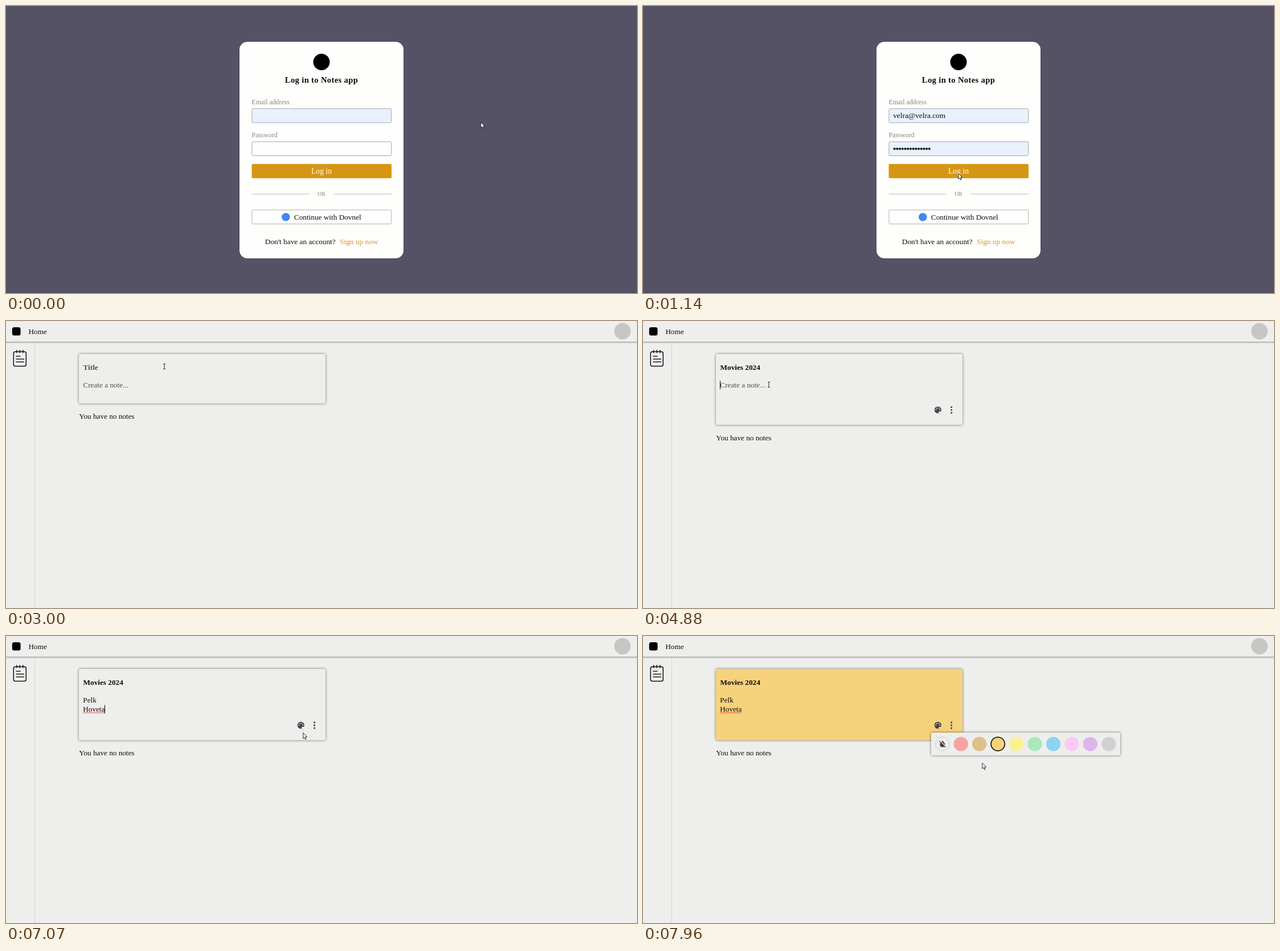
An HTML page with a canvas that plays this animation: 1108 by 505 pixels, repeating every 8 s.

```html
<!DOCTYPE html>
<html lang="en">
<head>
<meta charset="utf-8">
<title>Notes app</title>
<style>
  html, body { margin: 0; width: 100%; height: 100%; overflow: hidden; }
  canvas { display: block; }
</style>
</head>
<body>
<canvas id="stage" width="1108" height="505"></canvas>
<script>
const ctx = document.getElementById('stage').getContext('2d');
const LOOP = 8000;
const SERIF = '"Liberation Serif", "Times New Roman", serif';
const PAPER = '#eeeeec', INK = '#0c0c0c', GREY = '#505050';
const EMAIL = 'velra@velra.com';
const TITLE = 'Movies 2024', LINE1 = 'Pelk', LINE2 = 'Hoveta';

// Times of the key presses
const TITLE_KEYS = [3070, 3070, 3180, 3620, 3700, 3770, 4000, 4060, 4120, 4180, 4330];
const LINE1_KEYS = [5400, 5550, 5600, 5660];
const LINE2_KEYS = [6110, 6190, 6270, 6350, 6430, 6510];

// Caret: field, shown from, shown until
const CARETS = [
  ['note', 2070, 2330], ['note', 2620, 2770], ['title', 2770, 3000],
  ['title', 3070, 3480], ['title', 3620, 4590], ['note', 4880, 5140],
  ['note', 5400, 6770], ['note', 7030, 7230]
];

// Pointer: time, x, y
const POINTER = [
  [140, 833, 204], [340, 690, 193], [440, 654, 192], [540, 651, 193],
  [740, 652, 281], [880, 652, 281], [1140, 553, 294], [1770, 553, 294],
  [2030, 278, 80], [4600, 278, 80], [4840, 221, 112], [6770, 221, 112],
  [7070, 521, 170], [7150, 518, 158], [7270, 518, 158], [7510, 622, 188],
  [7630, 622, 188], [7960, 595, 223]
];

const SWATCHES = [PAPER, '#f7a3a2', '#dec08b', '#f6d27c', '#f8f18f',
  '#a8e8ba', '#8fd3f3', '#fdcaf4', '#dcb6ea', '#d1d1d3'];

function text(str, x, y, { size = 13.2, color = INK, weight = 'normal', align = 'left',
  family = SERIF, spacing = 0 } = {}) {
  ctx.font = `${weight} ${size}px ${family}`;
  ctx.textAlign = align;
  ctx.letterSpacing = spacing + 'px';
  ctx.fillStyle = color;
  ctx.fillText(str, x, y);
  return ctx.measureText(str).width;
}

function paint(fill, stroke, width = 1) {
  if (fill) { ctx.fillStyle = fill; ctx.fill(); }
  if (stroke) { ctx.strokeStyle = stroke; ctx.lineWidth = width; ctx.stroke(); }
}

function box(x, y, w, h, r, fill, stroke, width) {
  ctx.beginPath();
  ctx.roundRect(x, y, w, h, r);
  paint(fill, stroke, width);
}

function disc(x, y, r, fill, stroke, width) {
  ctx.beginPath();
  ctx.arc(x, y, r, 0, Math.PI * 2);
  paint(fill, stroke, width);
}

function line(x1, y1, x2, y2, color, width = 1) {
  ctx.beginPath();
  ctx.moveTo(x1, y1);
  ctx.lineTo(x2, y2);
  paint(null, color, width);
}

function raised(x, y, w, h, fill) {
  ctx.save();
  ctx.shadowColor = 'rgba(0,0,0,.55)';
  ctx.shadowBlur = 4;
  box(x, y, w, h, 3, fill);
  ctx.restore();
}

const typed = (str, keys, t) => str.slice(0, keys.filter(k => t >= k).length);

function pointerAt(t) {
  const next = POINTER.findIndex(p => p[0] > t);
  if (next < 0) return POINTER[POINTER.length - 1].slice(1);
  if (next === 0) return POINTER[0].slice(1);
  const [t0, x0, y0] = POINTER[next - 1], [t1, x1, y1] = POINTER[next];
  const u = (t - t0) / (t1 - t0);
  return [x0 + (x1 - x0) * u, y0 + (y1 - y0) * u];
}

function drawArrow(x, y) {
  ctx.save();
  ctx.translate(x + 0.8, y + 0.6);
  ctx.beginPath();
  ctx.moveTo(0, 0);
  for (const [px, py] of [[0, 9.8], [2.2, 7.9], [3.8, 11.3], [5.3, 10.6], [3.8, 7.3], [6.8, 7]]) {
    ctx.lineTo(px, py);
  }
  ctx.closePath();
  paint('#fff', '#111', 0.9);
  ctx.restore();
}

function drawBeam(x, y) {
  line(x, y - 4, x, y + 4, '#222', 1);
  for (const dy of [-4.5, 4.5]) line(x - 2, y + dy, x + 2, y + dy, '#222', 0.9);
}

function drawLogin(t) {
  const preview = t >= 600, filled = t >= 880;
  ctx.fillStyle = '#545264';
  ctx.fillRect(0, 0, 1108, 505);
  ctx.fillStyle = '#464553';
  ctx.fillRect(0, 504, 1108, 1);
  box(410, 63, 288, 381, 14, '#fefefc');
  disc(554, 98.5, 14.5, '#000');
  text('Log in to Notes app', 554, 135, { size: 14.6, weight: 'bold', align: 'center', spacing: 0.35 });

  const label = { size: 11.75, color: '#85857f' };
  text('Email address', 431.5, 173.2, label);
  text('Password', 431.5, 231.2, label);
  box(431.9, 180.7, 244.8, 24.6, 2, '#e8f1fc', '#a3a8af');
  box(431.9, 238.9, 244.8, 24.6, 2, preview ? '#e8f1fc' : '#fefefc', '#a3a8af');
  if (preview) {
    const style = filled ? { size: 13.35 }
      : { size: 9.6, family: '"Liberation Sans", Arial, sans-serif' };
    text(EMAIL, 439.2, 197.2, style);
    const gap = filled ? 4.71 : 3.4;
    for (let i = 0; i < 14; i++) disc(441.6 + gap * i, 251.2, gap * 0.42, INK);
  }

  box(431.5, 278, 245.5, 25, 2, '#d69614');
  text('Log in', 554, 295.2, { size: 13.6, color: '#fff', align: 'center' });
  line(432, 331, 533, 331, '#b9b9b7');
  line(575, 331, 677, 331, '#b9b9b7');
  text('OR', 554, 334.2, { size: 9.8, color: '#85857f', align: 'center' });
  box(431.9, 358.9, 244.8, 24.6, 2, null, '#b0b0ae');
  disc(491.3, 371.4, 7.2, '#4285f4');
  text('Continue with Dovnel', 505.8, 375.8, { size: 13.27 });
  text("Don't have an account?", 454.8, 418.6, { size: 13.3 });
  text('Sign up now', 586, 418.6, { size: 13.35, color: '#d69432' });
}

function drawShell() {
  ctx.fillStyle = PAPER;
  ctx.fillRect(0, 0, 1108, 505);
  line(50.5, 38, 50.5, 505, '#d4d4d2');
  ctx.save();
  ctx.shadowColor = 'rgba(0,0,0,.6)';
  ctx.shadowBlur = 3;
  ctx.fillStyle = PAPER;
  ctx.fillRect(-10, -10, 1128, 46.5);
  ctx.restore();
  box(10.8, 11, 14.8, 14.5, 3.5, '#000');
  text('Home', 39.6, 22.6);
  disc(1082.5, 18, 14.5, '#c6c6c4');

  box(13.3, 54, 22, 25.4, 3, null, '#111', 1.5);
  for (const x of [18.8, 24.3, 29.8]) line(x, 51, x, 56.3, '#111', 1.5);
  line(17.5, 62, 25.5, 62, '#111', 1.4);
  line(17.5, 67, 32, 67, '#111', 1.4);
  line(17.5, 72, 32, 72, '#111', 1.4);
}

function drawTools(y) {
  disc(517.8, y, 6.1, '#444');
  disc(521.4, y + 4.6, 2.6, '#444');
  for (const [dx, dy] of [[-3.6, -0.4], [-1.7, -3], [1.7, -3], [3.6, -0.4]]) {
    disc(517.8 + dx, y + dy, 1, PAPER);
  }
  ctx.beginPath();
  ctx.moveTo(518.6, y + 6.4);
  ctx.lineTo(519.6, y + 2.8);
  ctx.lineTo(524.6, y + 2.4);
  ctx.lineTo(524.6, y + 7.4);
  ctx.closePath();
  paint(drawTools.back);
  for (const dy of [-5, 0, 5]) disc(541.6, y + dy, 1.6, '#444');
}

function drawSquiggle(x, y, width) {
  ctx.beginPath();
  for (let dx = 0; dx <= width; dx += 0.5) {
    ctx.lineTo(x + dx, y + Math.sin(dx * Math.PI * 2 / 3.2) * 0.9);
  }
  paint(null, '#e23030', 0.9);
}

function drawNote(t) {
  const tall = t >= 3620, grown = t >= 5400;
  const bottom = grown ? 183.3 : tall ? 182.7 : 145;
  const fill = t >= 7590 ? SWATCHES[3] : PAPER;
  raised(128, 58, 433, bottom - 58, fill);

  const title = typed(TITLE, TITLE_KEYS, t);
  const line1 = typed(LINE1, LINE1_KEYS, t);
  const line2 = typed(LINE2, LINE2_KEYS, t);
  const bold = { weight: 'bold', size: 13.25 };
  let titleWidth = 0;
  if (title) titleWidth = text(title, 135.5, 85.5, bold);
  else text('Title', 135.5, 85.5, { ...bold, color: GREY });

  const width1 = line1 ? text(line1, 135.3, 116.7) : 0;
  if (!line1) text('Create a note...', 135.3, 116.7, { size: 13.25, color: GREY });
  const width2 = text(line2, 135.3, 133.2);
  if (t >= 6770) drawSquiggle(135.3, 135, width2);

  if (tall) {
    drawTools.back = fill;
    drawTools(grown ? 157.1 : 156.5);
  }
  text('You have no notes', 128.3, bottom + 27);

  const caret = CARETS.find(([, from, to]) => t >= from && t < to);
  if (caret) {
    const second = t >= 5810;
    const inTitle = caret[0] === 'title';
    const dx = inTitle ? titleWidth : second ? width2 : width1;
    const y = inTitle ? 74 : second ? 121.4 : 105;
    ctx.fillStyle = '#000';
    ctx.fillRect(Math.round(135 + dx), y, 1, inTitle ? 14 : 15);
  }
}

function drawDropOff(x, y) {
  ctx.beginPath();
  ctx.moveTo(x, y - 6);
  ctx.bezierCurveTo(x + 3, y - 2.5, x + 4.6, y - 1, x + 4.6, y + 1.2);
  ctx.arc(x, y + 1.2, 4.6, 0, Math.PI);
  ctx.bezierCurveTo(x - 4.6, y - 1, x - 3, y - 2.5, x, y - 6);
  paint('#444');
  line(x - 4.6, y - 6, x + 6.4, y + 5, PAPER, 1.3);
  line(x - 5.6, y - 5, x + 5.4, y + 6, '#444', 1.3);
}

function drawPalette(t) {
  raised(506, 170, 332, 40, PAPER);
  const chosen = t >= 7590 ? 3 : 0;
  SWATCHES.forEach((color, i) => {
    const x = 525.8 + 32.45 * i;
    disc(x, 190, 12.6, color);
    if (i === 0) {
      disc(x, 190, 12.2, null, '#c8c8c6');
      drawDropOff(x, 190);
    }
    if (i === chosen) disc(x, 190, 12.1, null, '#000', 1.5);
  });
}

function drawNotes(t) {
  drawShell();
  if (t < 2070) {
    box(128.4, 58.5, 432.2, 48.3, 3, null, '#9d9d9b');
    text('Create a note...', 136, 78.6, { size: 13.25, color: GREY });
    text(t < 1810 ? 'Loading' : 'You have no notes', 128.3, 134.6);
  } else {
    drawNote(t);
  }
  if (t >= 7230) drawPalette(t);
}

function overText(x, y, t) {
  if (t < 1660) return x > 432 && x < 677 && y > 181 && y < 205;
  return x > 135 && x < 553 && y > 60 && y < (t < 2070 ? 106 : 140);
}

function draw(t) {
  (t < 1660 ? drawLogin : drawNotes)(t);
  const [x, y] = pointerAt(t);
  (overText(x, y, t) ? drawBeam : drawArrow)(x, y);
}

const start = performance.now();
function tick() {
  draw((performance.now() - start) % LOOP);
  requestAnimationFrame(tick);
}
tick();
</script>
</body>
</html>
```
